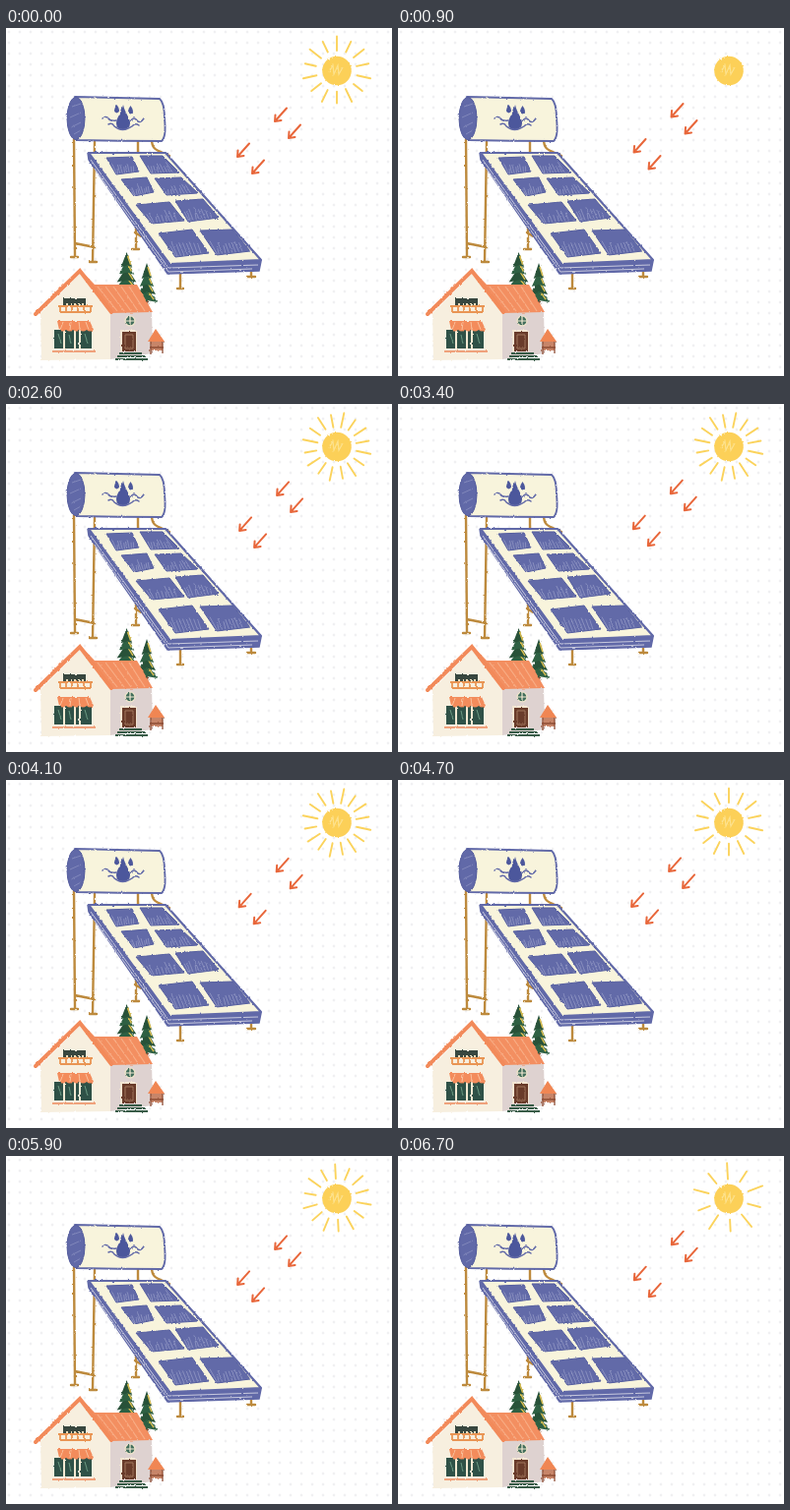
Recreate the animation shown at these times as an HTML page. Size 392 by 354 pixels, loop 6800 ms.

```html
<!DOCTYPE html>
<html lang="en">
<head>
<meta charset="utf-8">
<title>Solar water heater</title>
<style>
  html, body { margin: 0; width: 100%; height: 100%; overflow: hidden; background: #fff; }
  svg { display: block; width: 392px; height: 354px; }
  .ink { stroke: #6169a8; fill: none; stroke-linecap: round; stroke-linejoin: round; }
  .wood { stroke: #bd8a3d; fill: none; stroke-width: 2.4; stroke-linecap: round; stroke-linejoin: round; }
  .ray { stroke: #fbd35c; stroke-width: 1.9; stroke-linecap: round; fill: none; }
  .arrow { stroke: #e8673b; stroke-width: 2; stroke-linecap: round; stroke-linejoin: round; fill: none; }
</style>
</head>
<body>
<svg viewBox="0 0 392 354">
  <defs>
    <pattern id="dots" x="-2.5" y="-1.5" width="11" height="11" patternUnits="userSpaceOnUse">
      <circle cx="5.5" cy="5.5" r=".9" fill="#dedee1"/>
    </pattern>
    <filter id="crayon" x="-5%" y="-5%" width="110%" height="110%" color-interpolation-filters="sRGB">
      <feTurbulence type="fractalNoise" baseFrequency=".3" numOctaves="2" seed="4"/>
      <feDisplacementMap in="SourceGraphic" scale="2.2" xChannelSelector="R" yChannelSelector="G"/>
    </filter>
  </defs>
  <rect width="392" height="354" fill="#fff"/>
  <rect width="392" height="354" fill="url(#dots)"/>

  <g filter="url(#crayon)">
    <!-- stand -->
    <g class="wood">
      <path d="M69 113L70 232M90 116L88 237M70 219L90 223M66 233h7M85 238h7"/>
      <path d="M134 113V126M132 190V224M131 208l8 5M128 225h7"/>
      <path d="M177 249V264M174 265h6M249 243V253M245 253h8"/>
      <path d="M148 113C148 125 154 124 166 130"/>
    </g>

    <!-- tank -->
    <path class="ink" style="fill:#f8f4dc" stroke-width="1.9" d="M70 70L156 72Q161 76 161 92Q163 111 158 115Q114 115 72 114Z"/>
    <ellipse cx="71" cy="92" rx="9" ry="21.500" fill="#6169a8" stroke="#545c9d"/>
    <path d="M67 80l9-3M65 91l11-5M66 101l10-5M69 108l7-4" stroke="#8a90c0" stroke-width=".8"/>
    <g fill="#4c579c">
      <path d="M119 78C121 87 126 91 126 97A6.500 6.500 0 0 1 112 97C112 91 117 87 119 78Z"/>
      <path id="drop" d="M112.500 78q5 7 0 8.500q-5-1.500 0-8.500Z"/>
      <use href="#drop" x="14" y="1"/>
    </g>
    <path class="ink" stroke-width="1.500" d="M98 92q4-3 6 0t8 2M127 94q3-4 6 0t7-2M104 98q4-2 6 2q8 7 18 0q3-4 7-1"/>

    <!-- panel -->
    <path d="M83 127L84 134L164 250L257 247L259 237L166 240Z" fill="#6169a8" stroke="#6169a8" stroke-width="1.500"/>
    <path d="M86 134L165 244L256 241M90 143L165 248L250 245" fill="none" stroke="#d3d4e4" stroke-width=".9"/>
    <path class="ink" style="fill:#f8f4dc" stroke-width="2.200" d="M84 127L162 127L259 236L166 240Z"/>
    <g id="cells"></g>
  </g>

  <g filter="url(#crayon)">
    <g id="trees"></g>
    <!-- house -->
    <path d="M35 290L75 250L107 288V337L36 338Z" fill="#f7efdf"/>
    <path d="M106 287H148L149 331L106 337Z" fill="#ded2d0"/>
    <path d="M75 245L90 261L133 261L149 289L106 290Z" fill="#f38f61"/>
    <path d="M93 263l20 25M101 263l19 25M109 263l18 25M117 263l17 25M125 263l16 25" stroke="#f8ad85" stroke-width="1.200"/>
    <path d="M30 291L75 247L107 289" fill="none" stroke="#f28a5a" stroke-width="4" stroke-linecap="round"/>

    <!-- balcony -->
    <path d="M58 275H81V283H58Z" fill="#38473f"/>
    <path d="M61 281h18" stroke="#e9dfbf" stroke-width="1.800" stroke-dasharray="2 2"/>
    <path d="M53 283H88M55 289H86M55 282v7M61 283v6M67 283v6M73 283v6M79 283v6M86 282v7" stroke="#e99554" stroke-width="1.800"/>

    <!-- awning and windows -->
    <path d="M49 307H87V326H49Z" fill="#2f5147"/>
    <path d="M59 307v19M70 307v19M75 307v19" stroke="#f4ead3" stroke-width="2"/>
    <path d="M53 311l3 10M64 312l2 9M80 311l3 10" stroke="#6c9a82" stroke-width="1"/>
    <path d="M52 298H85L89 307q-4 3-7 0q-4 3-7 0q-3 3-7 0q-3 3-7 0q-4 3-7 0Z" fill="#f38c5c"/>
    <path d="M58 299l-3 8M66 299l-1 8M74 299l1 8M81 299l3 8" stroke="#fac19c"/>
    <path d="M47 329H91" stroke="#f0a27c" stroke-width="2"/>

    <!-- entrance -->
    <path d="M116 307H133V329H116Z" fill="#f3e6d3"/>
    <path d="M118 309H132V329H118Z" fill="#693b2a"/>
    <path d="M121 312h8v14h-8Z" fill="none" stroke="#a77d64" stroke-width=".9"/>
    <circle cx="126" cy="298" r="5" fill="#416d5b" stroke="#f1e5cd" stroke-width="1.200"/>
    <path d="M121 298h10M126 293v10" stroke="#f4ead3" stroke-width="1.200"/>
    <path d="M115 331H138M113 334H141M111 337H144" stroke="#395c48" stroke-width="2"/>

    <!-- stall -->
    <path d="M147 318H159V328H147Z" fill="#c78569"/>
    <path d="M147 318V332M159 318V331M146 325H160" stroke="#8e4d35" stroke-width="1.300"/>
    <path d="M152 306L161 319H144Z" fill="#f08653"/>
  </g>

  <g id="rays"></g>
  <g filter="url(#crayon)">
    <circle cx="336" cy="43.500" r="14.800" fill="#fcd058"/>
    <path d="M328 45l4-7 1 9 4-9 1 9 4-7" fill="none" stroke="#fde28e" stroke-width="1.200"/>
  </g>
  <g id="arrows" class="arrow"></g>
</svg>

<script>
const LOOP = 6800, STEP = 100;
const SWAY = 1460, REACH = 5.2;
const SUN = { x: 336, y: 43.5, cycle: 390 };
const $ = id => document.getElementById(id);

function add(parent, tag, attrs) {
  const el = document.createElementNS("http://www.w3.org/2000/svg", tag);
  for (const key in attrs) el.setAttribute(key, attrs[key]);
  parent.append(el);
  return el;
}

let seed = 7;
const rnd = () => (seed = seed * 16807 % 2147483647) / 2147483647;

// Corners in order: top left, top right, bottom right, bottom left.
const cells = [
  [102, 132, 128, 131, 135, 146, 112, 149], [136, 130, 159, 130, 176, 147, 147, 148],
  [117, 154, 143, 152, 150, 167, 130, 171], [151, 153, 178, 152, 195, 168, 163, 170],
  [132, 180, 166, 177, 181, 196, 148, 199], [172, 176, 200, 174, 216, 193, 185, 197],
  [155, 209, 189, 205, 206, 229, 172, 233], [197, 206, 230, 205, 248, 227, 214, 231]
];

function drawCell(c) {
  const at = (u, v) => [0, 1].map(k =>
    ((c[k] * (1 - u) + c[k + 2] * u) * (1 - v) + (c[k + 6] * (1 - u) + c[k + 4] * u) * v).toFixed(1));
  add($("cells"), "path", { d: `M${c.slice(0, 2)}L${c.slice(2)}Z`, fill: "#626aa8", stroke: "#565fa0", "stroke-width": 1 });
  let d = "";
  for (let i = 0; i < 9; i++) {
    const u = .08 + i * .1, v = .35 + rnd() * .35;
    d += `M${at(u, v)}L${at(Math.max(.03, u - .1), .97)}`;
  }
  add($("cells"), "path", { d, stroke: "#a3a8cf", "stroke-width": .6, fill: "none" });
}
cells.forEach(drawCell);

function drawTree(x, top, height, half) {
  const g = $("trees");
  add(g, "path", { d: `M${x} ${top + height - 4}v9`, stroke: "#76513a", "stroke-width": 2.5 });
  for (let i = 3; i >= 0; i--) {
    const y = top + i * height * .2, w = half * (.48 + i * .17), b = y + height * .4;
    add(g, "path", { d: `M${x} ${y}L${x + w} ${b}L${x} ${b - 2}L${x - w} ${b}Z`, fill: i % 2 ? "#2e6043" : "#285239" });
    add(g, "path", { d: `M${x + 1} ${y + 4}l${w * .55} ${height * .23}`, stroke: "#d9bd52", "stroke-width": 1.5 });
  }
}
drawTree(143, 239, 40, 11);
drawTree(122.5, 228, 38, 12);

function rayPose(count, turn, inner, long, short) {
  let d = "";
  for (let i = 0; i < count; i++) {
    const a = (turn - 90 + i * 360 / count) * Math.PI / 180;
    const point = r => `${(SUN.x + r * Math.cos(a)).toFixed(1)} ${(SUN.y + r * Math.sin(a)).toFixed(1)}`;
    d += `M${point(inner + i % 3 * .6)}L${point(i % 2 ? short : long)}`;
  }
  return add($("rays"), "path", { d, class: "ray" });
}

const poses = {
  upright: rayPose(14, 0, 20.5, 35, 33),
  leaning: rayPose(14, -3, 20.5, 35, 33),
  sparse: rayPose(10, -3, 20, 36.5, 33),
  turned: rayPose(16, 12, 20, 35, 33)
};
const rayTable = [[0, "upright"], [40, "leaning"], [60, "sparse"], [100, "none"], [200, "turned"], [320, "upright"]];

for (const [x, y] of [[273, 95], [287, 112], [235, 131], [250, 148]])
  add($("arrows"), "path", { d: `M${x + 12} ${y - 13.5}L${x} ${y}M${x + .5} ${y - 6.5}L${x} ${y}l6.500-1` });

function draw(t) {
  const shift = REACH * (1 - Math.cos(2 * Math.PI * t / SWAY)) / 2;
  $("arrows").setAttribute("transform", `translate(${shift} ${-shift})`);

  const phase = t % SUN.cycle;
  const current = rayTable.filter(([start]) => start <= phase).pop()[1];
  for (const name in poses) poses[name].style.display = name === current ? "" : "none";
}

function tick() {
  draw(Math.floor(performance.now() % LOOP / STEP) * STEP);
  requestAnimationFrame(tick);
}
tick();
</script>
</body>
</html>
```
